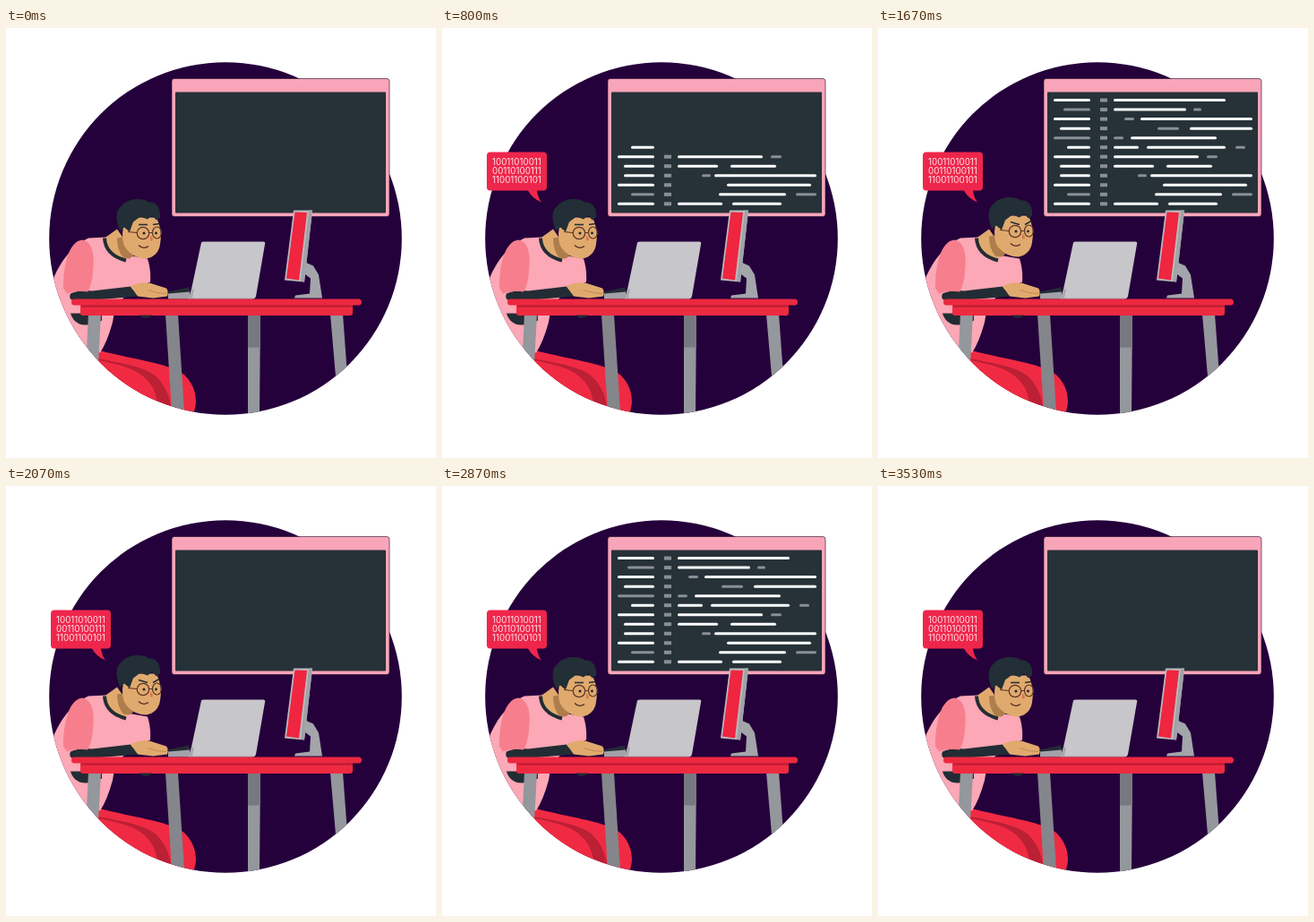
These frames come from a looping animation (480x480 px, 3.59 s). An HTML page:

```html
<!DOCTYPE html>
<html lang="en">
<head>
<meta charset="utf-8">
<title>Coder at a desk</title>
<style>
  html, body { margin: 0; width: 100%; height: 100%; overflow: hidden; background: #fff; }
  svg { display: block; width: 100%; height: 100%; }
  text { font: 9.8px Inter, Roboto, sans-serif; fill: #ffe3e8; }
</style>
</head>
<body>
<svg viewBox="0 -.5 480 480">
  <clipPath id="disc"><circle cx="245" cy="234.5" r="196.8"/></clipPath>
  <circle cx="245" cy="234.5" r="196.8" fill="#25013b"/>

  <!-- Wall screen -->
  <rect x="185" y="56" width="243" height="154" rx="3" fill="#f9a5b9" stroke="#1c0a26" stroke-width=".6"/>
  <rect x="189" y="71" width="235" height="135" rx="1" fill="#263238"/>
  <g id="code" stroke-width="3" stroke-linecap="round"></g>

  <g clip-path="url(#disc)">
    <!-- Chair -->
    <path d="M100 358C125 366 165 371 190 381C206 388 215 407 211 424L206 440H90Z" fill="#f12a43"/>
    <path d="M100 368C126 373 154 377 167 388C178 398 184 412 185 432H110Z" fill="#bb2035"/>
    <path d="M100 370C123 374 146 380 155 390C165 399 170 411 170 432H100Z" fill="#f12a43"/>

    <!-- Torso -->
    <path d="M46 300C52 276 66 246 92 234L112 233L135 253L158 257Q162 269 161 283L140 292L122 310L119 328Q113 350 105 362L70 350Z" fill="#fca8b6"/>
    <path d="M72 318H107V326Q94 333 82 330Q74 326 72 318Z" fill="#222c34"/>

    <!-- Legs of the desk -->
    <g fill="#94979c">
      <path d="M92 319H106L103 375L90 360Z"/>
      <path d="M178 319H192L199 428H185Z" fill="#84868b"/>
      <path d="M270 319H284L283 432H270Z"/>
      <path d="M362 319H376L382 400H369Z"/>
    </g>
    <path d="M270 319H284V356H270Z" fill="#777980"/>
  </g>

  <!-- Near arm -->
  <path d="M72 296Q83 291 96 293L139 288L147 299L100 303H73Q70 300 72 296Z" fill="#222c34"/>
  <path d="M64 290C64 264 70 238 85 236C98 238 99 256 97 272Q96 286 91 294Q78 292 68 296Z" fill="#f77f8d"/>
  <path d="M139 288Q148 283 160 284L179 290Q182 294 180 299L164 301L147 299Z" fill="#e0aa6e"/>
  <path d="M158 292L169 295L179 296" fill="none" stroke="#bb8149" stroke-width=".8"/>

  <!-- Neck and head -->
  <path d="M110 234L124 224L142 250L133 258Q113 252 110 234Z" fill="#e0aa6e"/>
  <path d="M110 234Q111 253 134 259" fill="none" stroke="#222c34" stroke-width="4"/>
  <g id="head">
    <path d="M124 234L137 232L147 250L138 257L131 256Q124 248 124 234Z" fill="#ad7d4c"/>
    <path d="M131 220L143 211L168 211Q175 226 172 241Q170 254 157 257Q143 257 134 246Q128 238 131 220Z" fill="#e0aa6e"/>
    <path d="M127 226C123 215 121 204 129 198C135 190 151 188 160 194C168 193 173 201 172 211L168 214L163 209L158 213L150 210L142 216L138 227L132 222Z" fill="#222f36"/>
    <g fill="none" stroke="#5c3326" stroke-width="1.2">
      <circle cx="153" cy="228.500" r="6.700"/>
      <ellipse cx="168.500" cy="228" rx="5" ry="6.500"/>
      <path d="M136 227L146 228M160 228L164 228"/>
    </g>
    <circle cx="154" cy="228.500" r="1.500" fill="#20242a"/>
    <circle cx="167.500" cy="228.500" r="1.400" fill="#20242a"/>
    <path d="M161 231Q167 237 161 237" fill="#d9754f"/>
    <path d="M148 242Q153 247 159 243" fill="none" stroke="#4d2921" stroke-width="1.200"/>
    <g fill="none" stroke="#222f36" stroke-width="1.600">
      <path id="browLeft"/><path id="browRight"/>
    </g>
  </g>

  <!-- Laptop -->
  <path d="M180 294L204 289L206 296H181Z" fill="#222c34"/>
  <path d="M181 296L205 294V302H181Z" fill="#a2a2a8"/>
  <path d="M218 239Q219 238 221 238H287Q290 238 289 241L279 299Q278 302 275 302H204L207 291Z" fill="#c7c6cb"/>
  <path d="M204 302L207 291L210 291L208 301H276V302Z" fill="#a9a8ae"/>

  <!-- Monitor -->
  <path d="M334 261L343 265L349 275L353 301H322L323 298L339 296L340 279L332 273Z" fill="#a3a5aa"/>
  <path d="M321 203L342 203L333 283L311 281Z" fill="#b9b9be"/>
  <path d="M322.500 205L336 205.500L327 281L313 279Z" fill="#f0253f"/>
  <path d="M338 203H342L333 283L329 282Z" fill="#a0a2a7"/>

  <!-- Desk -->
  <rect x="83" y="307" width="304" height="13.500" rx="3" fill="#ee2a41"/>
  <rect x="73" y="302" width="324" height="7" rx="3.500" fill="#ec2840"/>
  <path d="M84 309H387V311H84Z" fill="#b91d31"/>
  <path d="M149 320H163Q159 324 153 323Z" fill="#222c34"/>

  <!-- Speech bubble, scaled about its lower right corner -->
  <g id="bubble">
    <path d="M54 138H113Q117 138 117 142V177Q117 181 113 181H106Q107 189 111 194Q101 190 96 181H54Q50 181 50 177V142Q50 138 54 138Z" fill="#ef264b"/>
    <g id="digits">
      <text x="56" y="152">10011010011</text>
      <text x="56" y="162.200">00110100111</text>
      <text x="56" y="172.400">11001100101</text>
    </g>
    <g id="smear" opacity=".45">
      <use href="#digits" transform="translate(-2 -3)"/>
      <use href="#digits" transform="translate(2 3)"/>
    </g>
  </g>
</svg>
<script>
const LOOP = 3590, WRITE = LOOP / 2, POP = LOOP / 3;
const find = id => document.getElementById(id);
const clamp = v => Math.max(0, Math.min(1, v));
const smooth = (a, b, t) => { const k = clamp((t - a) / (b - a)); return k * k * (3 - 2 * k); };

// Rows from bottom to top: "start-end" segments, a leading g means grey.
const rows = [
  "196-237 263-313 324-379",
  "g211-237 309-384 g395-418",
  "196-237 318-412",
  "203-237 g290-300 304-418",
  "203-237 263-308 322-373",
  "196-237 263-358 g367-379",
  "211-237 263-291 300-388 g399-410",
  "g196-237 g263-274 282-378",
  "203-237 g312-336 348-418",
  "196-237 g275-286 293-418",
  "g207-237 263-344 g352-361",
  "196-237 263-388"
];

function addLine(attributes) {
  const line = document.createElementNS("http://www.w3.org/2000/svg", "line");
  for (const name in attributes) line.setAttribute(name, attributes[name]);
  return find("code").appendChild(line);
}

const segments = rows.flatMap((row, index) => {
  const y = 195.8 - index * 10.52;
  const add = (from, to, stroke, extra) => ({
    index, from, to,
    line: addLine({ x1: from, x2: to, y1: y, y2: y, stroke, ...extra })
  });
  const parts = row.split(" ").map(part => {
    const [from, to] = part.replace("g", "").split("-").map(Number);
    return add(from + 1.5, to - 1.5, part[0] === "g" ? "#899095" : "#fff");
  });
  return [...parts, add(248, 256, "#899095", { "stroke-width": 4, "stroke-linecap": "butt" })];
});

function drawCode(t) {
  for (const { index, from, to, line } of segments) {
    const reach = 190 + 230 * clamp((t - 614 - index * 30) / 33);
    const shown = t < 1730 && reach > from;
    line.setAttribute("visibility", shown ? "visible" : "hidden");
    line.setAttribute("x2", Math.max(from, Math.min(to, reach)));
  }
}

function drawBubble(t) {
  const scale = t < 20 ? 0 : 1 - (1 - clamp(t / 140)) ** 2.3;
  const moving = scale < 0.97;
  const bubble = find("bubble");
  bubble.setAttribute("transform", `translate(117 194) scale(${scale}) translate(-117 -194)`);
  bubble.style.filter = moving ? "blur(1px)" : "none";
  find("smear").setAttribute("visibility", moving ? "visible" : "hidden");
  find("digits").setAttribute("opacity", moving ? 0.6 : 1);
}

function drawHead(t) {
  const lift = smooth(1100, 1600, t) - smooth(2500, 2850, t);
  find("head").setAttribute("transform", `translate(0 ${-2 * lift})`);
  find("browLeft").setAttribute("d", `M148 ${219 - lift}L158 ${219 + 2 * lift}`);
  find("browRight").setAttribute("d", `M164 ${219 + 2 * lift}L171 ${218 - lift}`);
}

const start = performance.now();
function frame() {
  const t = (performance.now() - start) % LOOP;
  drawCode(t % WRITE);
  drawBubble(t % POP);
  drawHead(t);
  requestAnimationFrame(frame);
}
frame();
</script>
</body>
</html>
```
